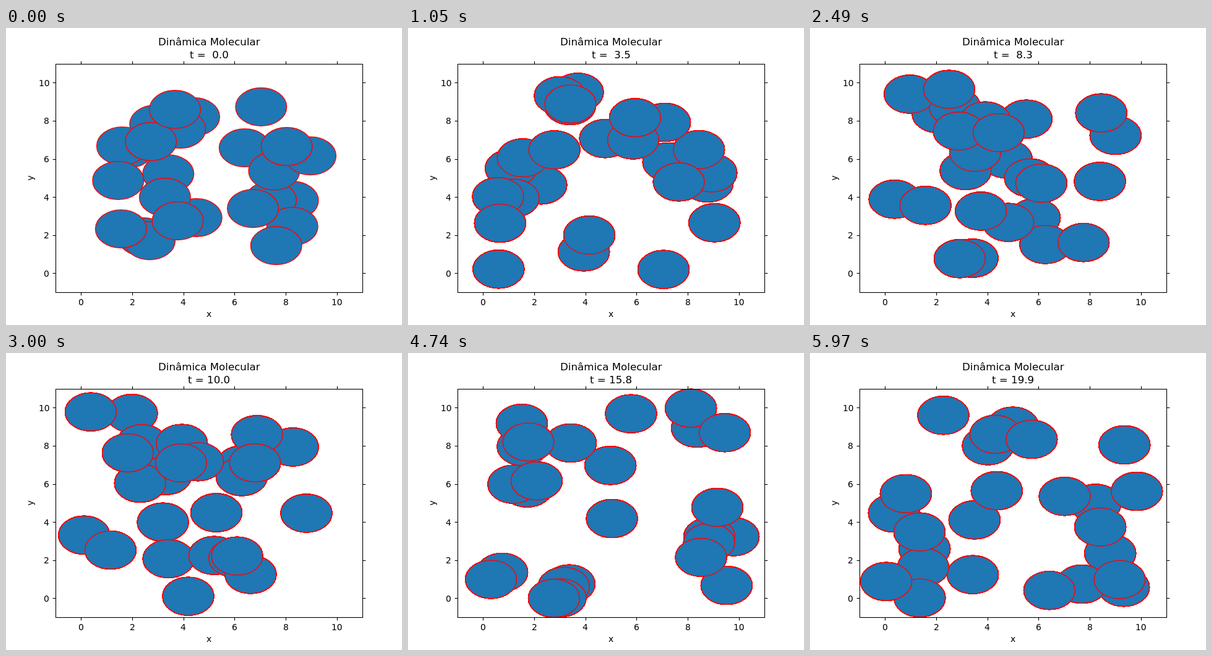
Recreate the animation shown at these times as an HTML page with a canvas. Size 640x480 px, loop 6 s.

```html
<!DOCTYPE html>
<html lang="pt">
<head>
<meta charset="utf-8">
<style>
html, body { margin: 0; width: 640px; height: 480px; overflow: hidden; background: #fff; }
canvas { display: block; }
</style>
</head>
<body>
<canvas id="plot" width="640" height="480"></canvas>
<script>
const ctx = document.getElementById('plot').getContext('2d');
const FRAME_MS = 30, FRAMES = 200, BOX = 10, MAX_PASSES = 20;
const LEFT = 80, TOP = 57.6, WIDTH = 496, HEIGHT = 369.6;
const UX = WIDTH / 12, UY = HEIGHT / 12;
const toX = x => LEFT + (x + 1) * UX;
const toY = y => TOP + HEIGHT - (y + 1) * UY;
const snap = v => Math.floor(v + 0.5) + 0.5;

// Start state from back to front: x, y, vx, vy. All motion follows from it.
const particles = [
  [2.43, 1.91, -.0445, .7786],
  [4.42, 8.21, -.2045, .3676],
  [6.40, 6.58, .241, -.212],
  [8.28, 3.82, .84, .262],
  [7.42, 3.83, .43, .4106],
  [1.85, 6.53, .443, .648],
  [7.55, 5.37, -.793, .485],
  [2.90, 7.82, .03, .8185],
  [3.41, 5.22, .001, 1.6855],
  [8.26, 2.46, .943, 1.15],
  [8.97, 6.16, -.376, -.3914],
  [7.63, 1.45, -.164, -.3565],
  [1.61, 6.68, -.149, -.3365],
  [6.72, 3.40, .665, -.215],
  [4.51, 2.92, -.845, .8955],
  [1.45, 4.87, -.755, -.2655],
  [2.68, 1.71, .36, -.809],
  [1.56, 2.33, -.613, .4835],
  [3.28, 3.99, -.747, -.3885],
  [3.87, 7.56, .925, .1025],
  [2.73, 6.91, .407, -1.4015],
  [8.04, 6.65, -.621, .098],
  [7.04, 8.73, -.313, -.163],
  [3.67, 8.60, -.252, -.607],
  [3.78, 2.75, -.907, -.724]
];

// Straight motion reflected by walls at 0 and BOX
function bounce(v) {
  const period = 2 * BOX;
  const m = ((v % period) + period) % period;
  return m > BOX ? period - m : m;
}

// Text starts on whole pixels; align is the share of its width left of x
function text(str, x, y, size, align = 0.5) {
  ctx.font = size + 'px "DejaVu Sans", sans-serif';
  const width = ctx.measureText(str).width;
  ctx.fillText(str, Math.round(x - width * align), Math.round(y));
}

function line(x1, y1, x2, y2) {
  ctx.beginPath();
  ctx.moveTo(x1, y1);
  ctx.lineTo(x2, y2);
  ctx.stroke();
}

function drawParticles(time, passes) {
  const spots = particles.map(([x, y, vx, vy]) =>
    [toX(bounce(x + vx * time)), toY(bounce(y + vy * time))]);
  ctx.save();
  ctx.beginPath();
  ctx.rect(LEFT, TOP, WIDTH, HEIGHT);
  ctx.clip();
  ctx.fillStyle = '#1f77b4';
  ctx.strokeStyle = '#f00';
  ctx.lineWidth = 1.39;
  // Repeated passes harden the outer edges
  for (let i = 0; i < passes; i++) {
    for (const [x, y] of spots) {
      ctx.beginPath();
      ctx.ellipse(x, y, UX, UY, 0, 0, 2 * Math.PI);
      ctx.fill();
      ctx.stroke();
    }
  }
  ctx.restore();
}

function drawAxes() {
  const l = snap(LEFT), r = snap(LEFT + WIDTH), t = snap(TOP), b = snap(TOP + HEIGHT);
  ctx.strokeStyle = ctx.fillStyle = '#000';
  ctx.lineWidth = 1.11;
  ctx.strokeRect(l, t, r - l, b - t);
  for (let v = 0; v <= BOX; v += 2) {
    const x = snap(toX(v)), y = snap(toY(v));
    line(x, b, x, b + 4.86);
    line(x, t, x, t - 4.86);
    line(l, y, l - 4.86, y);
    line(r, y, r + 4.86, y);
    text(v, toX(v), 448, 13.89);
    text(v, 70.3, toY(v) + 5.3, 13.89, 1);
  }
  text('x', 328, 467, 13.89);
  ctx.save();
  ctx.translate(44, 242.4);
  ctx.rotate(-Math.PI / 2);
  text('y', 0, 0, 13.89);
  ctx.restore();
}

function draw(frame) {
  const time = frame / 10;
  ctx.fillStyle = '#fff';
  ctx.fillRect(0, 0, 640, 480);
  drawParticles(time, Math.min(frame + 1, MAX_PASSES));
  drawAxes();
  text('Dinâmica Molecular', 328, 28, 16.667);
  text('t = ' + time.toFixed(1).padStart(4), 328, 49, 16.667);
}

const start = performance.now();
let shown = -1;
function tick() {
  const frame = Math.floor((performance.now() - start) / FRAME_MS) % FRAMES;
  if (frame !== shown) draw(shown = frame);
  requestAnimationFrame(tick);
}
tick();
</script>
</body>
</html>
```
